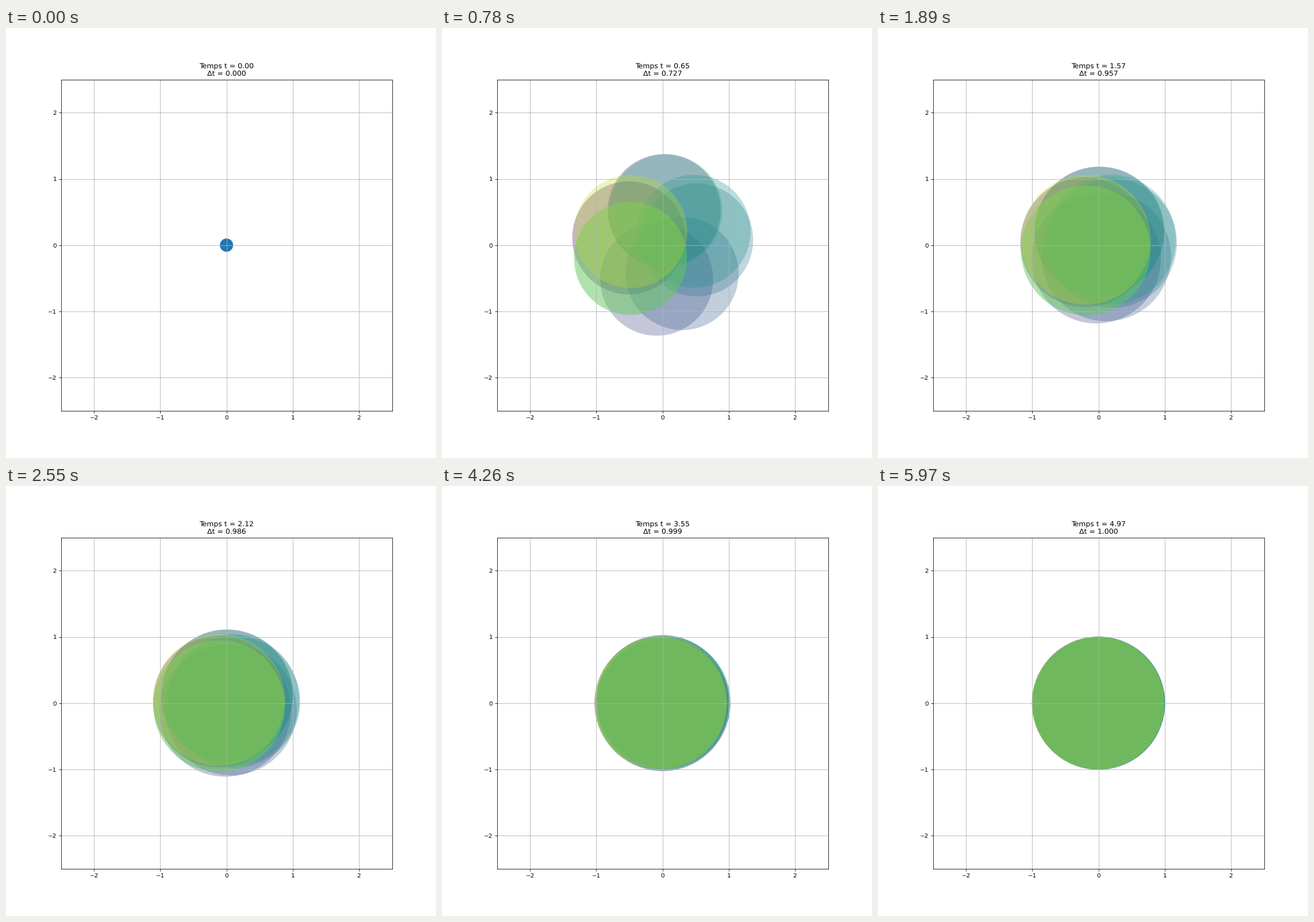
Animation of 748 by 748 pixels, one loop 6 s. Source, as a matplotlib script:

```python
import numpy as np
import matplotlib.pyplot as plt
from matplotlib.animation import FuncAnimation
from matplotlib.patches import Circle

FRAMES = 200
DURATION = 5.0
INTERVAL = 30
CORE = 0.1

plt.rcParams["text.hinting"] = "none"

# Starting directions on the unit circle, in drawing order
angles = np.radians([167.8, 87.2, 260.3, 304.6, 8.7, 23.7, 84.4, 202.9, 201.7, 156.7])
starts = np.column_stack([np.cos(angles), np.sin(angles)])

fig, ax = plt.subplots(figsize=(10, 10), dpi=74.8)
fig.subplots_adjust(left=0.1253, right=0.9003)  # puts the frame on whole pixels
ax.set_xlim(-2.5, 2.5)
ax.set_ylim(-2.5, 2.5)
ax.set_aspect("equal")
ax.grid(True)
title = ax.set_title("")

core = ax.add_patch(Circle((0, 0), CORE))
discs = [
    ax.add_patch(Circle(p, 0, facecolor=plt.cm.viridis(k / len(starts)),
                        edgecolor="none", alpha=0.3))
    for k, p in enumerate(starts)
]


def update(i):
    """Ornstein-Uhlenbeck: the means decay to zero, the spread grows to one."""
    t = DURATION * i / FRAMES
    decay = np.exp(-t)
    var = 1 - decay**2
    spread = np.sqrt(var)
    for disc, start in zip(discs, starts):
        disc.set_center(start * decay)
        disc.set_radius(spread)
    core.set_visible(decay + CORE > spread)  # gone once every disc covers it
    title.set_text(f"Temps t = {t:.2f}\nΔt = {var:.3f}")
    return [core, *discs, title]


anim = FuncAnimation(fig, update, frames=FRAMES, interval=INTERVAL, repeat=True)
plt.show()
```
